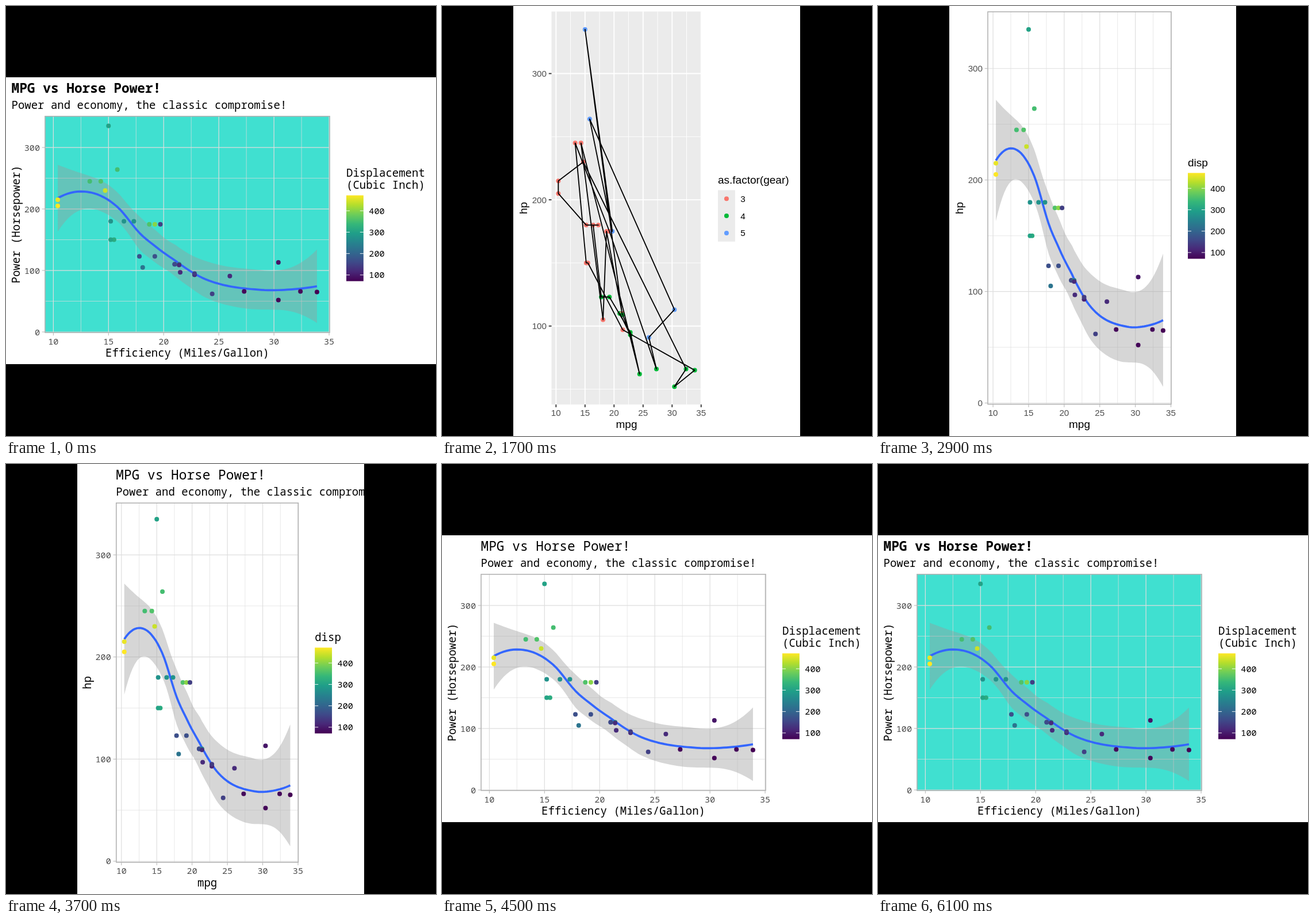
Recreate the animation shown at these times as an HTML page. Size 748 by 748 pixels, loop 8 s.

```html
<!DOCTYPE html>
<html lang="en">
<head>
<meta charset="utf-8">
<title>MPG vs Horse Power</title>
<style>
html, body { margin: 0; width: 100%; height: 100%; overflow: hidden; background: #000; }
svg { position: absolute; left: 0; top: 0; width: 748px; height: 748px; visibility: hidden; }
.sans { font-family: "Liberation Sans", Arial, sans-serif; }
.mono { font-family: "Noto Sans Mono", "DejaVu Sans Mono", monospace; }
text { white-space: pre; }
</style>
</head>
<body>
<script>
const LOOP = 8000, BASE = 19, SMALL = 15.2, KEY = 29.85;

// the plotted data set (mtcars), one column per variable
const mpg = [21, 21, 22.8, 21.4, 18.7, 18.1, 14.3, 24.4, 22.8, 19.2, 17.8, 16.4, 17.3, 15.2, 10.4, 10.4,
  14.7, 32.4, 30.4, 33.9, 21.5, 15.5, 15.2, 13.3, 19.2, 27.3, 26, 30.4, 15.8, 19.7, 15, 21.4];
const hp = [110, 110, 93, 110, 175, 105, 245, 62, 95, 123, 123, 180, 180, 180, 205, 215,
  230, 66, 52, 65, 97, 150, 150, 245, 175, 66, 91, 113, 264, 175, 335, 109];
const disp = [160, 160, 108, 258, 360, 225, 360, 147, 141, 168, 168, 276, 276, 276, 472, 460,
  440, 79, 76, 71, 120, 318, 304, 350, 400, 79, 120, 95, 351, 145, 301, 121];
const gear = '44433334444333333444333334555554';

const palettes = {
  blue: ['#132b43', '#56b1f7'],
  viridis: ['#440154', '#482878', '#3e4a89', '#31688e', '#26828e', '#1f9e89', '#35b779', '#6dcd59', '#b4de2c', '#fde725']
};
const gearHue = { 3: '#f8766d', 4: '#00ba38', 5: '#619cff' };

const range = (from, to, step) => Array.from({ length: Math.floor((to - from) / step + 1e-6) + 1 }, (_, i) => from + i * step);
const sum = list => list.reduce((a, b) => a + b, 0);
const dot = (a, b) => sum(a.map((v, i) => v * b[i]));

// Loess of hp on mpg: weights that give value and slope of the local parabola at v
function localFit(v) {
  const u = mpg.map(m => m - v), span = Math.floor(mpg.length * .75);
  const h = u.map(Math.abs).sort((a, b) => a - b)[span - 1];
  const w = u.map(e => Math.max(0, 1 - Math.abs(e / h) ** 3) ** 3);
  const [s0, s1, s2, s3, s4] = range(0, 4, 1).map(k => dot(w, u.map(e => e ** k)));
  const a = s2 * s4 - s3 * s3, b = s2 * s3 - s1 * s4, c = s1 * s3 - s2 * s2;
  const det = s0 * a + s1 * b + s2 * c;
  const row = (p, q, r) => u.map((e, i) => w[i] * (p + q * e + r * e * e) / det);
  return { v, value: row(a, b, c), slope: row(b, s0 * s4 - s2 * s2, s1 * s2 - s0 * s3) };
}

// halve the data until a cell is small; the cuts are where parabolas are fitted
function cuts(xs, lo, hi, least) {
  if (xs.length <= 4 || hi - lo <= least) return [];
  const mid = Math.floor((xs.length + 1) / 2) - 1;
  const at = range(0, xs.length - 2, 1).filter(i => xs[i] !== xs[i + 1])
    .sort((a, b) => Math.abs(a - mid) - Math.abs(b - mid) || b - a)[0];
  if (at === undefined) return [];
  const cut = (xs[at] + xs[at + 1]) / 2;
  return [...cuts(xs.slice(0, at + 1), lo, cut, least), cut, ...cuts(xs.slice(at + 1), cut, hi, least)];
}

function loess() {
  const lo = Math.min(...mpg), hi = Math.max(...mpg), pad = .005 * (hi - lo);
  const ends = [lo - pad, hi + pad];
  const sorted = [...mpg].sort((a, b) => a - b);
  const nodes = [ends[0], ...cuts(sorted, ...ends, .05 * (ends[1] - ends[0])), ends[1]].map(localFit);
  const weights = x => {
    const k = nodes.findIndex(n => n.v >= x), a = nodes[k - 1], b = nodes[k];
    const d = b.v - a.v, t = (x - a.v) / d, f = 1 - t;
    return mpg.map((_, i) => f * f * (1 + 2 * t) * a.value[i] + t * t * (3 - 2 * t) * b.value[i] +
      d * t * f * (f * a.slope[i] - t * b.slope[i]));
  };
  const rest = mpg.map((m, i) => weights(m).map((v, j) => (i === j) - v));
  const d1 = sum(rest.map(r => dot(r, r)));
  const d2 = sum(rest.flatMap(r => rest.map(q => dot(r, q) ** 2)));
  const sigma = Math.sqrt(sum(rest.map(r => dot(r, hp) ** 2)) / d1);
  const df = d1 * d1 / d2, t95 = 1.96 + 2.37 / df + 2.8 / df ** 2;
  return range(0, 79, 1).map(i => {
    const x = lo + (hi - lo) * i / 79, w = weights(x);
    return { x, y: dot(w, hp), half: t95 * sigma * Math.sqrt(dot(w, w)) };
  });
}
const trend = loess();

const rgb = hex => [1, 3, 5].map(i => parseInt(hex.slice(i, i + 2), 16));
const mix = (a, b, f) => a.map((v, i) => Math.round(v + (b[i] - v) * f));

function shade(name, value) {
  const stops = palettes[name], p = (value - 71) / 401 * (stops.length - 1);
  const i = Math.min(stops.length - 2, Math.floor(p));
  return `rgb(${mix(rgb(stops[i]), rgb(stops[i + 1]), p - i)})`;
}

const line = (x1, y1, x2, y2, colour, w) =>
  `<line x1="${x1}" y1="${y1}" x2="${x2}" y2="${y2}" stroke="${colour}" stroke-width="${w}"/>`;
const rect = (x, y, w, h, attrs = '') => `<rect x="${x}" y="${y}" width="${w}" height="${h}" ${attrs}/>`;
const text = (x, y, s, size, attrs = '') => `<text x="${x}" y="${y}" font-size="${size}" ${attrs}>${s}</text>`;

function mark(x, y, fill, shape) {
  if (shape === '4') return `<path d="M${x},${y - 5.6}l4.9,8.5h-9.8z" fill="${fill}"/>`;
  if (shape === '5') return rect(x - 3.5, y - 3.5, 7, 7, `fill="${fill}"`);
  return `<circle cx="${x}" cy="${y}" r="4" fill="${fill}"/>`;
}

function gearLegend(o) {
  const x = 480, top = 320.3;
  let s = text(x, top - 11.5, 'as.factor(gear)', BASE) + rect(x, top, KEY, KEY * 3, 'fill="#ebebeb"');
  ['3', '4', '5'].forEach((g, i) => {
    const y = top + (i + .5) * KEY;
    s += mark(x + KEY / 2, y, o.points === 'gear' ? gearHue[g] : '#000', o.points === 'shape' ? g : '') +
      text(x + KEY + 9.5, y + 5.5, g, SMALL);
  });
  return s;
}

function barLegend(o, id) {
  const [x, y] = o.bar, h = KEY * 5, stops = palettes[o.palette];
  let s = `<defs><linearGradient id="bar${id}" x1="0" y1="1" x2="0" y2="0">` +
    stops.map((c, i) => `<stop offset="${i / (stops.length - 1)}" stop-color="${c}"/>`).join('') +
    `</linearGradient></defs>` + rect(x, y, KEY, h, `fill="url(#bar${id})"`);
  o.key.forEach((t, i) => s += text(x, y - 11.5 - 20.5 * (o.key.length - 1 - i), t, BASE));
  for (const v of range(100, 400, 100)) {
    const ty = y + (472 - v) / 401 * h;
    s += line(x, ty, x + 6, ty, '#fff', .9) + line(x + KEY - 6, ty, x + KEY, ty, '#fff', .9) +
      text(x + KEY + 9.5, ty + 5.5, v, SMALL);
  }
  return s;
}

function chart(o, id) {
  const [l, t, r, b] = o.panel;
  const [lo, hi] = o.smooth ? [-1.3, 351.1] : [37.85, 349.15];
  const X = v => l + (v - 9.225) / 25.85 * (r - l);
  const Y = v => b - (v - lo) / (hi - lo) * (b - t);
  const edge = k => trend.map(p => [X(p.x), Y(p.y + k * p.half)]);
  const grid = o.light ? '#dedede' : '#fff';
  const [major, minor] = o.light ? [1.2, .7] : [1.84, .92];
  const tick = o.light ? ['#b3b3b3', 1] : ['#333', 1.84];
  const page = o.wide ? [0, 124, 748, 499] : [124, 0, 499, 748];

  let s = `<defs><clipPath id="page${id}">${rect(...page)}</clipPath></defs><g clip-path="url(#page${id})">` +
    rect(...page, 'fill="#fff"') + rect(l, t, r - l, b - t, `fill="${o.fill || (o.light ? '#fff' : '#ebebeb')}"`);

  const xs = range(10, 35, 5), ys = range(o.smooth ? 0 : 100, 300, 100);
  for (const v of range(12.5, 32.5, 5)) s += line(X(v), t, X(v), b, grid, minor);
  for (const v of range(50, 250, 100)) s += line(l, Y(v), r, Y(v), grid, minor);
  for (const v of xs) s += line(X(v), t, X(v), b, grid, major);
  for (const v of ys) s += line(l, Y(v), r, Y(v), grid, major);

  const colourOf = i => o.points === 'gear' ? gearHue[gear[i]] :
    o.points === 'disp' ? shade(o.palette, disp[i]) : '#000';
  const dots = mpg.map((m, i) => mark(X(m), Y(hp[i]), colourOf(i), o.points === 'shape' ? gear[i] : '')).join('');
  const curve = !o.smooth ? '' :
    `<polygon points="${[...edge(1), ...edge(-1).reverse()].join(' ')}" fill="#999" fill-opacity=".4"/>` +
    `<polyline points="${edge(0).join(' ')}" fill="none" stroke="#3366ff" stroke-width="3.7" stroke-linejoin="round"/>`;
  s += o.points === 'disp' ? curve + dots : dots + curve;
  if (o.path) s += `<polyline points="${mpg.map((m, i) => [X(m), Y(hp[i])]).join(' ')}" fill="none" stroke="#000" stroke-width="1.84" stroke-linejoin="round"/>`;
  if (o.light) s += rect(l + .5, t + .5, r - l - 1, b - t - 1, 'fill="none" stroke="#b3b3b3" stroke-width="1.6"');

  for (const v of xs) s += line(X(v), b, X(v), b + 4.75, ...tick) +
    text(X(v), b + 20.1, v, SMALL, 'text-anchor="middle" fill="#4d4d4d"');
  for (const v of ys) s += line(l - 4.75, Y(v), l, Y(v), ...tick) +
    text(l - 8.5, Y(v) + 5.5, v, SMALL, 'text-anchor="end" fill="#4d4d4d"');

  const yx = page[0] + 23.7, cy = (t + b) / 2;
  s += text((l + r) / 2, b + 41.2, o.names[0], BASE, 'text-anchor="middle"') +
    text(yx, cy, o.names[1], BASE, `text-anchor="middle" transform="rotate(-90 ${yx} ${cy})"`);
  if (o.title) {
    const tx = o.bold ? 9.5 : l;
    s += text(tx, page[1] + 26.7, 'MPG vs Horse Power!', 22.8, o.bold ? 'font-weight="700"' : '') +
      text(tx, page[1] + 54.6, 'Power and economy, the classic compromise!', BASE);
  }
  if (o.points === 'shape' || o.points === 'gear') s += gearLegend(o);
  if (o.bar) s += barLegend(o, id);
  return `<svg viewBox="0 0 748 748" class="${o.font}">${s}</g></svg>`;
}

// each step keeps what came before and changes a little
const steps = [
  [500, { font: 'sans', panel: [190.5, 9.6, 613.3, 693.2], names: ['mpg', 'hp'], points: 'plain' }],
  [900, { panel: [190.5, 9.6, 451.5, 693.2], points: 'shape' }],
  [1300, { points: 'gear' }],
  [1700, { path: true }],
  [2100, { path: false, smooth: true, points: 'plain', panel: [190.5, 9.6, 510.5, 693.2],
    palette: 'blue', bar: [539, 290.4], key: ['disp'] }],
  [2500, { points: 'disp' }],
  [2900, { light: true, palette: 'viridis' }],
  [3300, { title: true, panel: [190.5, 67, 510.5, 693.2], bar: [539, 319.2] }],
  [3700, { font: 'mono', panel: [191.3, 67.3, 508.9, 693.3], bar: [537.2, 319.4] }],
  [4100, { panel: [191.3, 67.3, 438.5, 693.3], bar: [467.2, 329.8], key: ['Displacement', '(Cubic Inch)'],
    names: ['Efficiency (Miles/Gallon)', 'Power (Horsepower)'] }],
  [4500, { wide: true, panel: [67.5, 191.4, 563.5, 568.4], bar: [592, 329.4] }],
  [4900, { bold: true }],
  [5300, { fill: '#40e0d0' }]
];
let state = {};
document.body.innerHTML = steps.map(([, change], i) => chart(state = { ...state, ...change }, i)).join('');
const views = [...document.querySelectorAll('svg')];

const began = performance.now();
function draw() {
  const t = Math.max(0, performance.now() - began) % LOOP;
  // before the first step the last one is still up
  const passed = steps.filter(([start]) => start <= t).length;
  const now = (passed || steps.length) - 1;
  views.forEach((v, i) => v.style.visibility = i === now ? 'visible' : 'hidden');
  requestAnimationFrame(draw);
}
draw();
</script>
</body>
</html>
```
